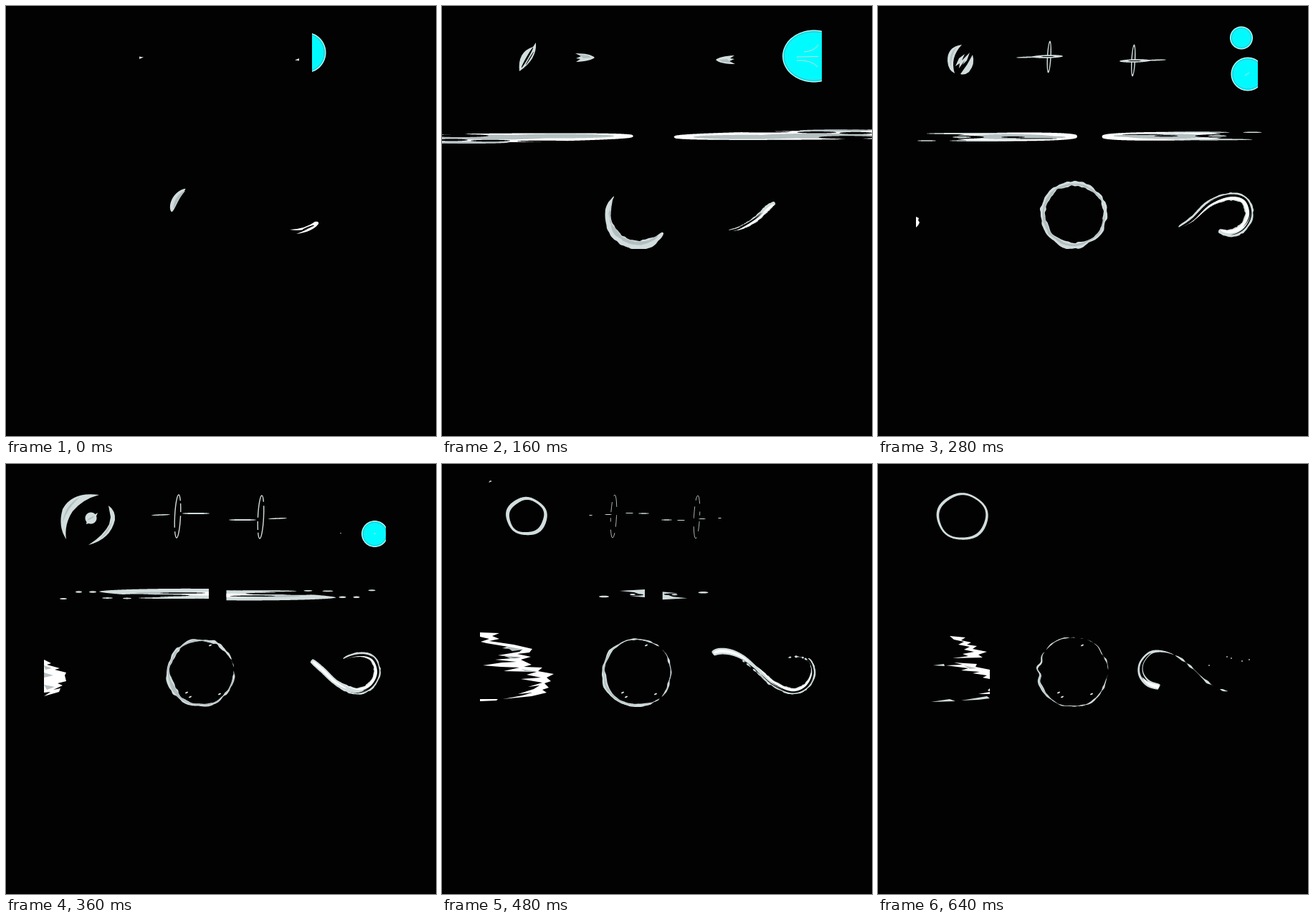
Write an HTML page with a canvas that moves like this. It is 600 px wide and 600 px high and loops after 680 ms.

```html
<!DOCTYPE html>
<html lang="en">
<head>
<meta charset="utf-8">
<title>Effect sprites</title>
<style>
html, body { margin: 0; width: 100%; height: 100%; overflow: hidden; background: #020202; }
canvas { display: block; }
</style>
</head>
<body>
<canvas id="stage" width="600" height="600"></canvas>
<script>
const ctx = document.getElementById('stage').getContext('2d');
const LOOP = 680;
const WHITE = '#fff', LIGHT = '#d2dddd', GRAY = '#b4bfc1', DARK = '#020202', CYAN = '#00fbff';
const TAU = Math.PI * 2;

// Curves: functions from a parameter to a point
const arc = (cx, cy, rx, ry = rx) => deg => {
  const a = deg * TAU / 360;
  return [cx + rx * Math.cos(a), cy + ry * Math.sin(a)];
};
const line = (x0, y0, x1, y1) => t => [x0 + (x1 - x0) * t, y0 + (y1 - y0) * t];
const spline = pts => t => {
  const last = pts.length - 1;
  const i = Math.max(0, Math.min(last - 1, Math.floor(t))), u = t - i;
  const at = k => pts[Math.max(0, Math.min(last, k))];
  return [0, 1].map(d => {
    const [p, q, r, s] = [at(i - 1)[d], at(i)[d], at(i + 1)[d], at(i + 2)[d]];
    return q + u / 2 * (r - p + u * (2 * p - 5 * q + 4 * r - s + u * (3 * (q - r) + s - p)));
  });
};

// Width profile: p shapes the tail, q the head
const leaf = (w, p = .5, q = .5) => {
  const norm = (p / (p + q)) ** p * (q / (p + q)) ** q;
  return s => w * s ** p * (1 - s) ** q / norm;
};

// Seeded periodic noise, about -1 to 1
const hash = n => {
  const v = Math.sin(n * 127.1) * 43758.5453;
  return (v - Math.floor(v)) * 2 - 1;
};
const wave = (s, seed, cells) => {
  const x = s * cells, i = Math.floor(x), u = x - i;
  const at = k => hash((k + cells) % cells + seed * 61);
  return at(i) + (at(i + 1) - at(i)) * u * u * (3 - 2 * u);
};
const noise = (s, seed) => .65 * wave(s, seed, 17) + .6 * wave(s, seed + 9, 53);

// Fills a ribbon of varying width along a curve
function ribbon(curve, a, b, width, color, off = 0) {
  const n = 240, left = [], right = [], e = (b - a) / 2000;
  for (let i = 0; i <= n; i++) {
    const s = i / n, t = a + (b - a) * s;
    const [x, y] = curve(t), [x0, y0] = curve(t - e), [x1, y1] = curve(t + e);
    const len = Math.hypot(x1 - x0, y1 - y0) || 1;
    const nx = (y0 - y1) / len, ny = (x1 - x0) / len;
    const half = Math.max(0, width(s)) / 2;
    const mid = typeof off === 'function' ? off(s) : off;
    left.push([x + nx * (mid + half), y + ny * (mid + half)]);
    right.unshift([x + nx * (mid - half), y + ny * (mid - half)]);
  }
  ctx.beginPath();
  left.concat(right).forEach(p => ctx.lineTo(...p));
  ctx.fillStyle = color;
  ctx.fill();
}
const dash = (x0, y0, x1, y1, w, color = LIGHT, p, q) =>
  ribbon(line(x0, y0, x1, y1), 0, 1, leaf(w, p, q), color);
const dot = (x, y) => dash(x - 2, y + 1, x + 2, y - 1, 2);
const shape = (d, color = LIGHT) => { ctx.fillStyle = color; ctx.fill(new Path2D(d)); };
const hair = (d, color, w = 1) => {
  ctx.strokeStyle = color; ctx.lineWidth = w; ctx.stroke(new Path2D(d));
};
function clip(x, y, w, h, draw) {
  ctx.save();
  ctx.beginPath(); ctx.rect(x, y, w, h); ctx.clip();
  draw();
  ctx.restore();
}
// Draws once as is and once turned half a circle
function twice(sx, sy, draw) {
  draw();
  ctx.save();
  ctx.transform(-1, 0, 0, -1, sx, sy);
  draw();
  ctx.restore();
}

// Curling streak
const track = spline([[396, 313], [415, 310], [437, 298], [462, 276], [490, 266], [511, 271],
  [518, 291], [508, 310], [488, 317], [462, 306], [440, 286], [420, 270], [400, 262],
  [381, 263], [368, 277], [367, 293], [377, 306], [392, 311]]);
function curl(a, b, w, p = .6, q = .2) {
  const body = leaf(w, p, q), mid = a + (b - a) * .78;
  ribbon(track, a, b, s => body(s) * (1 + .15 * noise(s, 2)), LIGHT);
  ribbon(track, a + .3, b - .1, s => body(s) * .4, WHITE, w * .16);
  ribbon(track, a, mid, leaf(w * .28, .3, .8), DARK, s => w * .12 * Math.cos(s * 5));
  ribbon(track, a + (b - a) * .25, b - .7, leaf(w * .14), DARK, -w * .2);
}
// Broken thread left behind a streak
const thread = (a, b, w, seed, off = 0) =>
  ribbon(track, a, b, s => w * (.45 + 1.3 * wave(s, seed, 13)), LIGHT, off);
const curls = [
  () => {
    shape('M396 312Q418 311 431 301Q437 300 436 304Q428 315 405 318Q420 313 430 305Q416 316 396 312Z', WHITE);
    dash(414, 312, 430, 306, 2, DARK);
  },
  () => curl(.3, 3.1, 8),
  () => curl(.6, 5.9, 10, .4),
  () => curl(1.2, 8.5, 12, .4),
  () => {
    curl(3.3, 9.5, 10, .4, .3);
    ribbon(track, 7.5, 10.7, leaf(8, .5, .15), LIGHT);
    ribbon(track, 8.5, 10.6, leaf(4, .5, .2), WHITE);
  },
  () => {
    curl(5, 10.4, 9, .5, .5);
    ribbon(track, 9, 13.2, leaf(9, .9, .15), LIGHT);
    ribbon(track, 10.5, 13.1, leaf(4, .6, .2), WHITE);
    thread(9, 11, 1.5, 3, -4);
    thread(3.7, 5.2, 2, 4, 3);
  },
  () => {
    ribbon(track, 10, 15.4, leaf(8, .9, .15), LIGHT);
    ribbon(track, 11, 14, leaf(2.5), DARK);
    thread(4, 10.5, 4, 6);
  },
  () => {
    ribbon(track, 11.3, 17.1, leaf(9, .9, .15), LIGHT);
    ribbon(track, 13, 16, leaf(3.5, .8, .5), DARK, -.8);
    ribbon(track, 15.3, 17, leaf(5, .8, .2), WHITE);
    thread(8, 11.6, 2.2, 4);
    [[487, 269], [493, 271], [508, 275], [518, 273], [462, 281]].forEach(
      ([x, y]) => dash(x - 1, y, x + 1, y, 1.5));
  }
];

// Rough hoop, heavier towards the lower left
function hoop(cx, cy, r, base, amp, seed, bump = 0, wobble = 0) {
  const at = (s, deg) => Math.exp(-(((s * 360 - deg) / 22) ** 2));
  const lean = s => 1 + .35 * Math.cos(s * TAU - 2.8);
  const off = s => 1.1 * wave(s, seed + 3, 23) + wobble * Math.sin(s * TAU * 15) * at(s, 185);
  const width = k => s => base * lean(s) + amp * noise(s, k) + bump * at(s, 155);
  const curve = arc(cx, cy, r);
  ribbon(curve, 0, 360, width(seed), LIGHT, off);
  ribbon(curve, 0, 360, s => width(seed + 1)(s) * .5 - .6, GRAY, s => off(s) + base * .15);
  if (bump) {
    dot(252, 319); dot(257, 325); dot(298, 321); dot(285, 253);
  }
}
const sweep = arc(274, 291, 42.5);
function crescent(end, w) {
  const body = leaf(w, .65, .4);
  ribbon(sweep, 217, end, s => body(s) * (1 + .25 * noise(s / 2, 3)), LIGHT);
  ribbon(sweep, 200, end + 12, s => body(s) * .35 * (1 + .8 * noise(s / 2, 6)), GRAY, -w * .2);
}
const hoops = [
  () => {
    ribbon(arc(274, 291, 43), 237, 185, leaf(9, .8, .6), LIGHT);
    ribbon(arc(274, 291, 41), 234, 192, leaf(4, .7, .7), GRAY);
  },
  () => crescent(36, 12),
  () => crescent(-105, 11),
  () => hoop(273.5, 291, 43.5, 6.2, 3.2, 1),
  () => hoop(272.5, 291, 45.8, 3.6, 3, 2, 4),
  () => hoop(272.5, 291, 47, 2.2, 2.4, 4, 4),
  () => hoop(272.5, 290, 48, 1.4, 2.2, 6, 3, 1),
  () => hoop(272, 290, 48.5, 1, 2, 8, 2, 2.5)
].map(draw => () => clip(200, 230, 150, 109, draw));

// Pair of sparks
function flare(h, w, hollow, bars) {
  dash(237.5, 73 + h, 240, 73 - h, w, LIGHT);
  dash(237.7, 73 + h - 3, 239.8, 73 - h + 3, hollow, DARK);
  bars.forEach(([x0, x1, y, t]) => dash(x0, y + .5, x1, y - .5, t));
}
function fadingFlare(dashes, w) {
  ctx.save();
  ctx.strokeStyle = LIGHT;
  ctx.lineWidth = w;
  ctx.setLineDash(dashes);
  ctx.beginPath();
  ctx.ellipse(239.5, 73, 4, 30, .05, 0, TAU);
  ctx.stroke();
  ctx.restore();
}
const sparks = [
  () => shape('M186 70.5L192 71.5L186 74Z'),
  () => {
    shape('M186 66Q207 66 213 72Q207 77 187 78L193 74L187 73L194 70Z');
    shape('M192 68L204 69L208 72L197 73Z', GRAY);
  },
  () => {
    dash(190, 72, 240, 70, 6);
    dash(192, 72, 222, 71, 2, DARK);
    dash(238, 84, 239, 58, 5);
  },
  () => {
    ctx.save();
    ctx.translate(0, -2);
    flare(22.5, 6, 3, [[193, 222, 73.5, 1.8], [215, 258, 72.5, 4.5]]);
    dash(228, 72.5, 246, 72.5, 1.2, DARK);
    ctx.restore();
  },
  () => {
    fadingFlare([40, 6, 55, 4, 12, 5], 1.4);
    dash(203, 71.5, 229, 70.5, 1.6);
    dash(246, 69, 284, 69, 2.2);
  },
  () => {
    fadingFlare([14, 9, 20, 11, 5, 8], .8);
    dash(205, 71.5, 210, 71.5, 1);
    dash(227, 70.5, 237, 70.5, 1);
    dash(256, 68.5, 267, 68.5, 1.2);
    dash(274, 69, 289, 69, 1.4);
  },
  () => fadingFlare([6, 16, 4, 20], .7)
].map(draw => () => twice(595, 147, draw));

// Long beams: rows of x0, x1, y, width, color
const rows = list => list.forEach(([x0, x1, y, w, color, p, q]) => dash(x0, y, x1, y, w, color, p, q));
const beams = [
  null,
  () => {
    shape('M-6 181Q5 182 6 186Q5 190 -6 191Z', WHITE);
    dash(-8, 186, 2, 186, 4, GRAY);
  },
  () => {
    ribbon(line(-60, 186, 267, 181.5), 0, 1, leaf(13, .1, .3), WHITE);
    rows([[-20, 150, 183, 7, GRAY], [90, 240, 181.5, 6, GRAY], [-10, 92, 190.5, 3, GRAY],
      [-14, 65, 181, 4, DARK], [-10, 36, 187, 3, DARK], [40, 95, 188, 2.5, DARK],
      [105, 175, 188.5, 1.5, DARK], [-5, 36, 178, 3, DARK]]);
  },
  () => {
    ribbon(line(110, 183, 278, 182), 0, 1, leaf(12, .3, .3), WHITE);
    rows([[68, 190, 178, 2.2, LIGHT], [55, 81, 188, 1.6], [100, 190, 188, 2],
      [130, 245, 182.5, 7, GRAY], [215, 262, 183, 3, GRAY], [85, 148, 183, 4.5, DARK],
      [172, 205, 183, 2, DARK], [192, 250, 185, 1.2, DARK], [104, 130, 183, 2]]);
  },
  () => {
    ribbon(line(130, 178, 330, 182), 0, 1, leaf(14, .6, .15), LIGHT);
    rows([[245, 310, 181, 5, WHITE], [180, 250, 180, 3, GRAY], [150, 215, 184.5, 6, DARK],
      [187, 256, 183.5, 2.4, DARK], [215, 278, 180, 1.6, DARK], [185, 283, 187, 2.2],
      [75, 85, 188, 2], [97, 106, 178.5, 2.5], [116, 126, 178.5, 2.5],
      [134, 149, 187, 1.8], [163, 175, 187.5, 1.8]]);
  },
  () => {
    ribbon(line(190, 178, 330, 181), 0, 1, leaf(12, .7, .15), LIGHT);
    rows([[215, 268, 183, 5, DARK], [240, 290, 179, 2, DARK], [150, 166, 178.5, 2.4],
      [180, 198, 187, 2], [226, 283, 187, 2]]);
  },
  () => {
    shape('M248 177L283 175V186L262 184L274 181L268 179Z');
    rows([[258, 281, 182.5, 2.6, DARK], [262, 270, 182, 2], [219, 233, 185, 2.6]]);
  }
].map(draw => draw && (() => twice(590.5, 364.3, () => clip(-10, 160, 293, 40, draw))));

// Jagged splash
const splashes = [
  null, null, null,
  () => shape('M53 294L57 296L56 299L58 302L56 306L53 309Z', WHITE),
  () => {
    shape('M53 273L63 278L57 280L75 285L68 287L84 291L82 295L84 303L72 306L79 309L66 315L76 313L74 318L53 324L62 318L53 319Z', WHITE);
    shape('M53 281L64 285L55 287ZM53 291L66 295L53 298ZM53 308L68 311L57 315Z', GRAY);
  },
  () => {
    shape('M53 248L84 255L72 259L98 265L88 269L106 275L98 279L120 286L114 291L126 296L116 301L122 307L110 311L114 317L88 323L53 328V322L84 316L70 311L94 306L64 300L88 295L54 290L80 284L53 279L76 273L53 268L70 262L53 258Z', WHITE);
    shape('M66 276L92 279L74 281ZM78 289L108 294L84 296ZM80 303L106 307L88 310Z', GRAY);
  },
  () => {
    shape('M53 235L80 236L70 240L80 244L66 247L100 252L126 258L122 263L105 265L124 269L110 273L125 280L114 283L140 284L134 289L156 293L146 298L152 303L143 306L149 312L140 315L146 319L125 324L85 328L112 323L126 319L106 321L128 314L136 309L120 311L140 305L110 300L138 298L118 294L132 290L86 289L108 284L82 283L57 281L84 277L104 276L74 273L110 270L78 267L108 262L112 259L84 257L92 255L62 250L54 248L66 244L53 241Z', WHITE);
    shape('M53 328L78 328L76 330L53 331Z', WHITE);
    shape('M88 254L114 259L98 261ZM84 267L108 269L95 271ZM110 286L134 290L118 290Z', GRAY);
  },
  () => {
    shape('M100 240L122 242L116 246L130 249L124 252L138 254L132 258L152 262L140 266L146 270L104 271L126 268L118 265L134 262L120 259L128 255L112 252L120 248L106 245Z', WHITE);
    shape('M106 277L138 279L136 283L156 287V300L146 298L152 295L132 292L142 290L116 288L126 285L95 281L118 280ZM156 313L153 316L156 317ZM140 321L156 318V321Z', WHITE);
    shape('M77 281L92 279L93 282ZM74 332L100 328L108 331ZM116 330L152 324L156 327L140 329Z');
    shape('M120 281L138 285L128 286Z', GRAY);
  }
];

// Slash that opens into a ring
const ringlet = (cx, cy, rx, ry, w, swing) => ribbon(arc(cx, cy, rx, ry), 0, 360,
  s => w + swing * Math.cos(TAU * (s * 2 - .2)), LIGHT, s => .5 * Math.sin(TAU * s * 5));
const rings = [
  null,
  () => {
    dash(124, 64, 147, 23, 2.6, LIGHT, .8, .3);
    dash(86, 124, 111, 88, 2.8, LIGHT, .3, .8);
    dash(85, 124, 95, 112, 2.2);
  },
  () => {
    shape('M131 51Q133 74 108 91Q105 64 127 57Z');
    dash(111, 86, 127, 58, 2.6, DARK);
    dash(117, 82, 128, 64, 1.2, DARK);
  },
  () => {
    shape('M117 54Q96 57 97 77Q98 90 107 94Q100 72 117 54Z');
    shape('M132 68Q136 81 127 92Q121 97 115 95Q125 82 132 68Z');
    shape('M108 84L113 73L121 67L117 76L128 65L124 76L118 82L121 76L113 87L114 80Z');
    shape('M110 57Q97 68 102 86Q101 69 110 57Z', GRAY);
  },
  () => {
    shape('M130 43Q92 38 79 63Q72 87 84 105Q81 84 93 66Q107 49 130 43Z');
    shape('M143 58Q153 65 152 78Q146 105 115 113Q137 99 144 84L146 74Z');
    shape('M103 46Q82 57 79 82Q85 62 103 46ZM149 77Q145 95 132 104Q145 88 149 77Z', GRAY);
    ribbon(arc(118.5, 75.5, 4), 0, 360, () => 8, LIGHT);
    shape('M123 71L128 68L125 75ZM113 78L112 84L118 82Z');
    dash(114, 78, 123, 73, 2, GRAY);
  },
  () => {
    ringlet(118, 74, 17, 17, 6.5, 1);
    ribbon(arc(114, 75, 48), 185, 255, leaf(5), LIGHT);
    ribbon(arc(114, 75, 46), 10, 62, leaf(4), LIGHT);
  },
  () => {
    ringlet(118, 73, 26.4, 24.6, 4.4, 1);
    shape('M65 26L67 23L70 24Z');
  },
  () => ringlet(117.7, 73.4, 34.2, 31.2, 3.3, .7)
];

// Cyan bubble
function bubble(cx, cy, rx, ry = rx, power = 2) {
  const outline = inset => {
    ctx.beginPath();
    for (let a = 0; a < TAU; a += TAU / 120) {
      const c = Math.cos(a), s = Math.sin(a), k = 2 / power;
      ctx.lineTo(cx + (rx - inset) * Math.sign(c) * Math.abs(c) ** k,
        cy + (ry - inset) * Math.sign(s) * Math.abs(s) ** k);
    }
    ctx.closePath();
  };
  outline(0); ctx.fillStyle = '#d8eeee'; ctx.fill();
  outline(1.2); ctx.fillStyle = CYAN; ctx.fill();
  ctx.lineWidth = .7;
  ctx.strokeStyle = '#10b4bc';
  outline(2.4); ctx.stroke();
  ctx.strokeStyle = '#48dce0';
  outline(4.5); ctx.stroke();
}
const FOLD = '#c4dad6';
const bubbles = [
  () => clip(427, 20, 100, 100, () => bubble(418, 65, 28.5)),
  () => {
    bubble(475, 69, 45.5, 34, 2.5);
    hair('M457 62Q478 60 500 63M448 69L498 69.5M448 75Q478 74 495 77', FOLD);
  },
  () => {
    bubble(519, 70, 44, 36.5);
    hair('M505 64Q520 63 525 54M495 71L525 70.5M495 76Q516 75 524 85', FOLD);
  },
  () => {
    bubble(507, 44.5, 16);
    bubble(516, 95, 23.5);
    hair('M512 97L518 93', FOLD);
  },
  () => {
    bubble(514.5, 97.5, 18.5);
    dash(514, 96, 515, 98, 1.5, FOLD);
    dash(466, 96.5, 468, 96.5, 1, GRAY);
  },
  () => bubble(514.5, 97.5, 8)
].map((draw, i) => i ? () => clip(400, 20, 130, 120, draw) : draw);

// Two interleaved step clocks
const early = [0, 80, 160, 240, 320, 400, 480, 560];
const late = [0, 120, 200, 280, 360, 440, 560, 640];
const cast = [
  [early, [beams, splashes, rings, bubbles]],
  [late, [curls, hoops, sparks]]
];

function render(now) {
  const t = now % LOOP;
  ctx.fillStyle = DARK;
  ctx.fillRect(0, 0, 600, 600);
  for (const [times, sprites] of cast) {
    const step = times.filter(start => start <= t).length - 1;
    sprites.forEach(poses => poses[step] && poses[step]());
  }
}

let begin;
function tick(now) {
  begin ??= now;
  render(now - begin);
  requestAnimationFrame(tick);
}
render(0);
requestAnimationFrame(tick);
</script>
</body>
</html>
```
